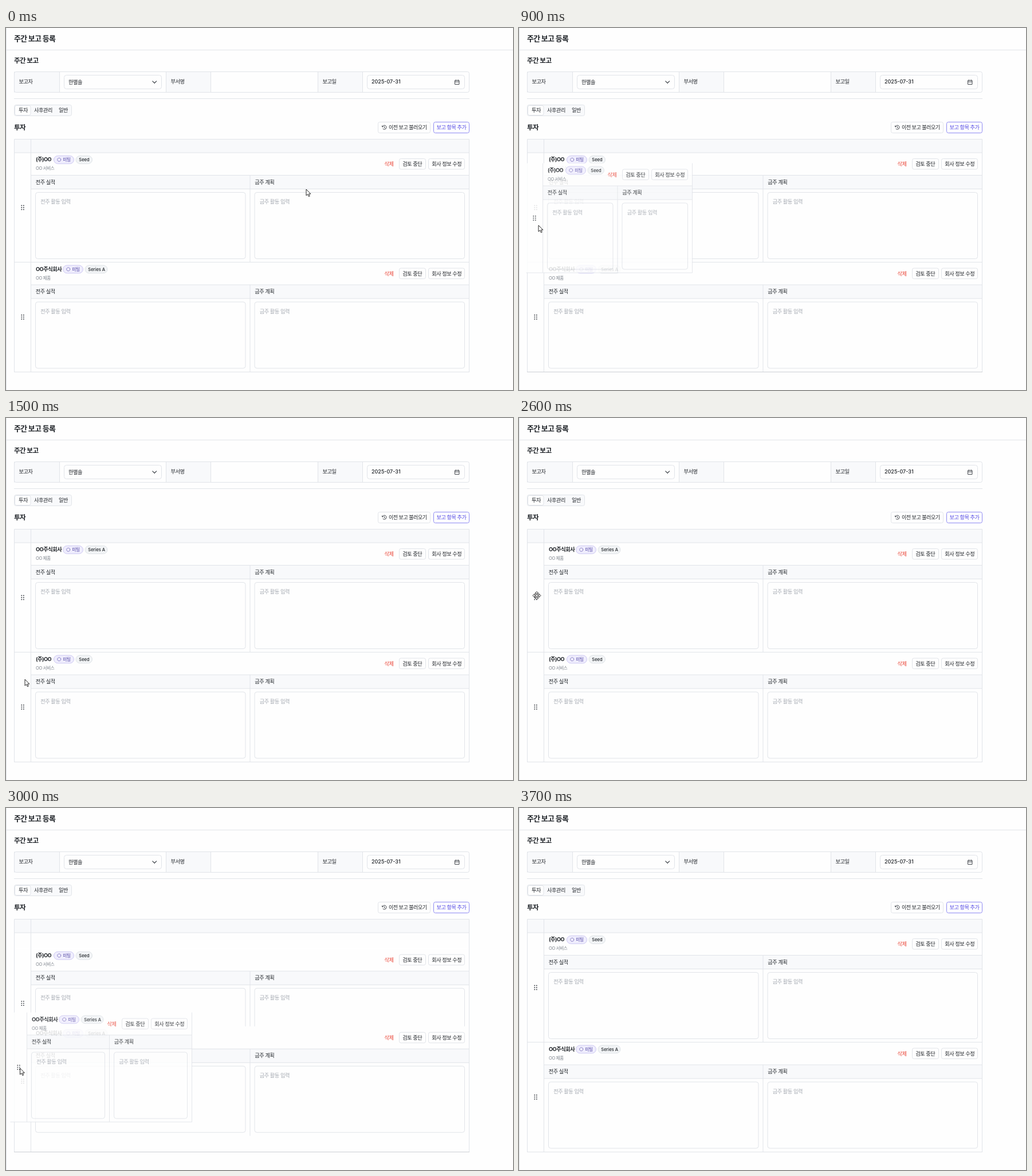
An HTML page that plays this animation: 885x633 px, repeating every 4000 ms.

```html
<!DOCTYPE html>
<html lang="ko">
<head>
<meta charset="utf-8">
<title>주간 보고 등록</title>
<style>
html, body { margin: 0; width: 100%; height: 100%; overflow: hidden; background: #fefefe; }
svg { display: block; }
text { font-family: Inter, "Noto Sans CJK KR", "Noto Sans CJK", sans-serif; white-space: pre; }
</style>
</head>
<body>
<svg id="stage" width="885" height="633" viewBox="0 0 885 633"></svg>
<script>
const LINE = '#e1e4e9', BAND = '#f8f9fb', INK = '#1f2328', ROW = 191.5;

// Drawing helpers; text is placed by its left edge and vertical centre.
const text = (x, y, s, { size = 9.2, weight = 500, fill = INK } = {}) => {
  const spacing = /[가-힣]/.test(s) ? -0.05 * size : 0;
  return `<text x="${x}" y="${y + 0.36 * size}" font-size="${size}" font-weight="${weight}" fill="${fill}" letter-spacing="${spacing}">${s}</text>`;
};
const rect = (x1, y1, x2, y2, { fill = '#fefefe', stroke = LINE, r = 0 } = {}) =>
  `<rect x="${x1}" y="${y1}" width="${x2 - x1}" height="${y2 - y1}" rx="${r}" fill="${fill}" stroke="${stroke}"/>`;
const band = (x1, y1, x2, y2, fill = BAND) => rect(x1, y1, x2, y2, { fill, stroke: 'none' });
const path = (d, stroke = LINE, more = '') => `<path d="${d}" fill="none" stroke="${stroke}" ${more}/>`;
const bold = size => ({ size, weight: 700 });

function page() {
  const cells = [[14.5, 93.5, '보고자'], [279.5, 357.5, '부서명'], [544.5, 622.5, '보고일']];
  return path('M.5 0V633') + text(14, 18, '주간 보고 등록', bold(12.9)) + path('M0 38.5H885') +
    text(14, 57, '주간 보고', bold(11.6)) +
    cells.map(([a, b, s]) => band(a, 76.5, b, 112.5) + path(`M${a} 76.5V112.5M${b} 76.5V112.5`) + text(a + 8, 94, s)).join('') +
    rect(14.5, 76.5, 808.5, 112.5, { fill: 'none', r: 3 }) +
    rect(101.5, 82.5, 271.5, 106.5, { r: 4 }) + text(109, 94.5, '한별솔') +
    path('M255.5 92.7l3.7 3.7 3.7-3.7', '#30353c', 'stroke-width="1.1"') +
    rect(630.5, 82.5, 800.5, 106.5, { r: 4 }) + text(638, 94, '2025-07-31', { size: 9 }) +
    path('M783.5 91.8h7.5v6.7h-7.5zM783.5 94.2h7.5M785.3 90.3v2M789.2 90.3v2', '#30353c', 'stroke-width=".9"') +
    path('M14 123.5H809') +
    rect(14.5, 134.5, 114.5, 153.5, { fill: BAND, r: 3 }) + rect(15.5, 135.5, 43, 152.5, { r: 3 }) +
    text(22, 144, '투자') + text(49, 144, '사후관리') + text(92, 144, '일반') +
    text(14, 174, '투자', bold(11.6)) +
    rect(649.5, 164.5, 740.5, 183.5, { r: 3 }) +
    path('M657.2 172.6a3.5 3.5 0 1 1 .5 3.2M656.6 170.6v2.2h2.2M660.5 172v2.2l1.6 1', '#30353c', 'stroke-width=".9"') +
    text(668, 174, '이전 보고 불러오기', { size: 9 }) +
    rect(746.5, 164.5, 808.5, 183.5, { r: 3, stroke: '#8e89f3' }) +
    text(751.5, 174, '보고 항목 추가', { fill: '#5147e5' }) +
    band(14.5, 194, 808.5, 218);
}

// One report row, drawn at the first slot; half is the width of each column.
function row({ name, note, tag, pillX, tagW }, half) {
  const mid = 43.5 + half, end = mid + half, tagX = pillX + 38.5;
  let dots = '';
  for (let i = 0; i < 6; i++)
    dots += `<circle cx="${27.3 + i % 2 * 3.5}" cy="${310.4 + (i >> 1) * 3.5}" r=".95" fill="#30353c"/>`;
  const button = (x, w, s) => rect(end - x, 228.5, end - x + w, 247, { r: 3 }) + text(end - x + 5.8, 237.7, s);
  const column = (x, title, hint) => text(x + 8.3, 269.3, title) +
    rect(x + 8, 287.5, x + half - 8, 403.5, { r: 4 }) +
    text(x + 16.7, 304, hint, { weight: 400, fill: '#a3a8b0' });
  return band(14.5, 218, end, 409.5, '#fefefe') + dots +
    text(52, 230, name, bold(9.2)) + text(52, 245.7, note, { size: 7.6, weight: 400, fill: '#7b818a' }) +
    rect(pillX, 223.5, pillX + 35, 237.3, { r: 7, fill: '#efedfd', stroke: '#cdc8f2' }) +
    `<circle cx="${pillX + 9.2}" cy="230.3" r="3" fill="none" stroke="#4b3fa0" stroke-width=".9" stroke-dasharray="1.5 .86"/>` +
    text(pillX + 15.8, 230.3, '미팅', { size: 7.7, fill: '#4b3fa0' }) +
    rect(tagX, 223.5, tagX + tagW, 237.3, { r: 7, fill: '#f2f4f6', stroke: '#e0e4e8' }) +
    text(tagX + 5.3, 230.3, tag, { size: 7.5 }) +
    text(end - 148, 237.7, '삭제', { fill: '#ea4335' }) +
    button(122, 46, '검토 중단') + button(71, 63, '회사 정보 수정') +
    band(43.5, 257.5, end, 281.5) + path(`M43.5 257.5H${end}M43.5 281.5H${end}M${mid} 257.5V409.5`) +
    column(43.5, '전주 실적', '전주 활동 입력') + column(mid, '금주 계획', '금주 활동 입력');
}
const preview = (data, half) => {
  const end = 43.5 + 2 * half;
  return row(data, half) + path(`M14.5 409.5H${end}V218M43.5 218V409.5`);
};

const seed = { name: '(주)OO', note: 'OO 서비스', tag: 'Seed', pillX: 83.5, tagW: 28.5 };
const series = { name: 'OO주식회사', note: 'OO 제품', tag: 'Series A', pillX: 99.5, tagW: 39 };
const group = (id, body) => `<g id="${id}">${body}</g>`;
const $ = id => document.getElementById(id);

$('stage').innerHTML = page() +
  group('rows', group('seedRow', row(seed, 382.5)) + group('seriesRow', row(series, 382.5))) +
  path('M14.5 194.5H808.5V601.5M14.5 194.5V601.5M14 218H809M43.5 194.5V601.5') +
  group('divider', path('M14 409.5H809')) + `<path id="floor" d="M14 601.5H809"/>` +
  group('seedDrag', preview(seed, 130.5)) + group('seriesDrag', preview(series, 144)) +
  group('arrow', '<path d="M0 0v11l2.6-2.3 1.8 4 1.8-.8-1.8-3.8h3.5z" fill="#fff" stroke="#111" stroke-width=".9"/>') +
  group('move', '<path d="M0-7l3 3h-2v3h3v-2l3 3-3 3v-2h-3v3h2l-3 3-3-3h2v-3h-3v2l-3-3 3-3v2h3v-3h-2z" fill="#fff" stroke="#111" stroke-width=".9"/>');

// Tracks of [time, x, y]
const pointer = [
  [0, 524, 282], [100, 497, 299], [200, 405, 351], [300, 265, 390], [400, 130, 376], [500, 55, 335],
  [600, 33, 313], [700, 32, 316], [800, 33, 322], [900, 34, 345], [1000, 34, 374], [1100, 34.5, 416],
  [1200, 34.5, 443], [1300, 33, 457], [1500, 33, 457], [1600, 33, 416], [1700, 31, 375], [1800, 25, 334],
  [1900, 18, 285], [2000, 16, 267], [2200, 16, 267], [2600, 31, 310.5], [2700, 31, 316], [2800, 31, 319],
  [2900, 29, 380], [3000, 24.5, 455], [3100, 24, 462], [3300, 24, 462], [3400, 340, 300], [3500, 821, 37], [3600, 844, 9]
];
const carry = [
  [700, 0, 1], [800, 0, 5], [900, -2, 18.5], [1000, 1, 58], [1100, 4, 104], [1200, 3, 128], [1300, 2, 142], [1500, 2, 142],
  [2700, 0, 1], [2800, 0, 3], [2900, -1.5, 65], [3000, -7, 139.5], [3100, -7, 146], [3300, -7, 146]
];
function at(track, t) {
  const i = track.findIndex(k => k[0] > t);
  if (i === 0) return track[0].slice(1);
  if (i < 0) return track.at(-1).slice(1);
  const [t0, x0, y0] = track[i - 1], [t1, x1, y1] = track[i], u = (t - t0) / (t1 - t0);
  return [x0 + (x1 - x0) * u, y0 + (y1 - y0) * u];
}
const easeOut = u => 1 - (1 - Math.min(1, Math.max(0, u))) ** 3;
const place = (id, x, y) => $(id).setAttribute('transform', `translate(${x} ${y})`);
const show = (id, on) => $(id).setAttribute('visibility', on ? 'visible' : 'hidden');
$('seedDrag').setAttribute('opacity', 0.86);
$('seriesDrag').setAttribute('opacity', 0.86);
let front;

function draw() {
  const t = Math.floor(performance.now() % 4000 / 100) * 100;
  const swap = easeOut((t - 1105) / 200) - easeOut((t - 2905) / 200);
  place('seedRow', 0, ROW * swap);
  place('seriesRow', 0, ROW * (1 - swap));
  const lower = t < 2000 ? 'seedRow' : 'seriesRow';
  if (lower !== front) $('rows').append($(front = lower));
  show('divider', swap < 0.01 || swap > 0.99);

  const first = t >= 700 && t < 1500, second = t >= 2700 && t < 3300;
  show('seedDrag', first);
  show('seriesDrag', second);
  place(first ? 'seedDrag' : 'seriesDrag', ...at(carry, t));
  $('floor').setAttribute('stroke', first || second ? '#cdd0d5' : LINE);

  const grab = t === 600 || t === 2600;
  show('move', grab);
  show('arrow', !grab && t < 3700);
  place(grab ? 'move' : 'arrow', ...at(pointer, t));
  requestAnimationFrame(draw);
}
draw();
</script>
</body>
</html>
```
